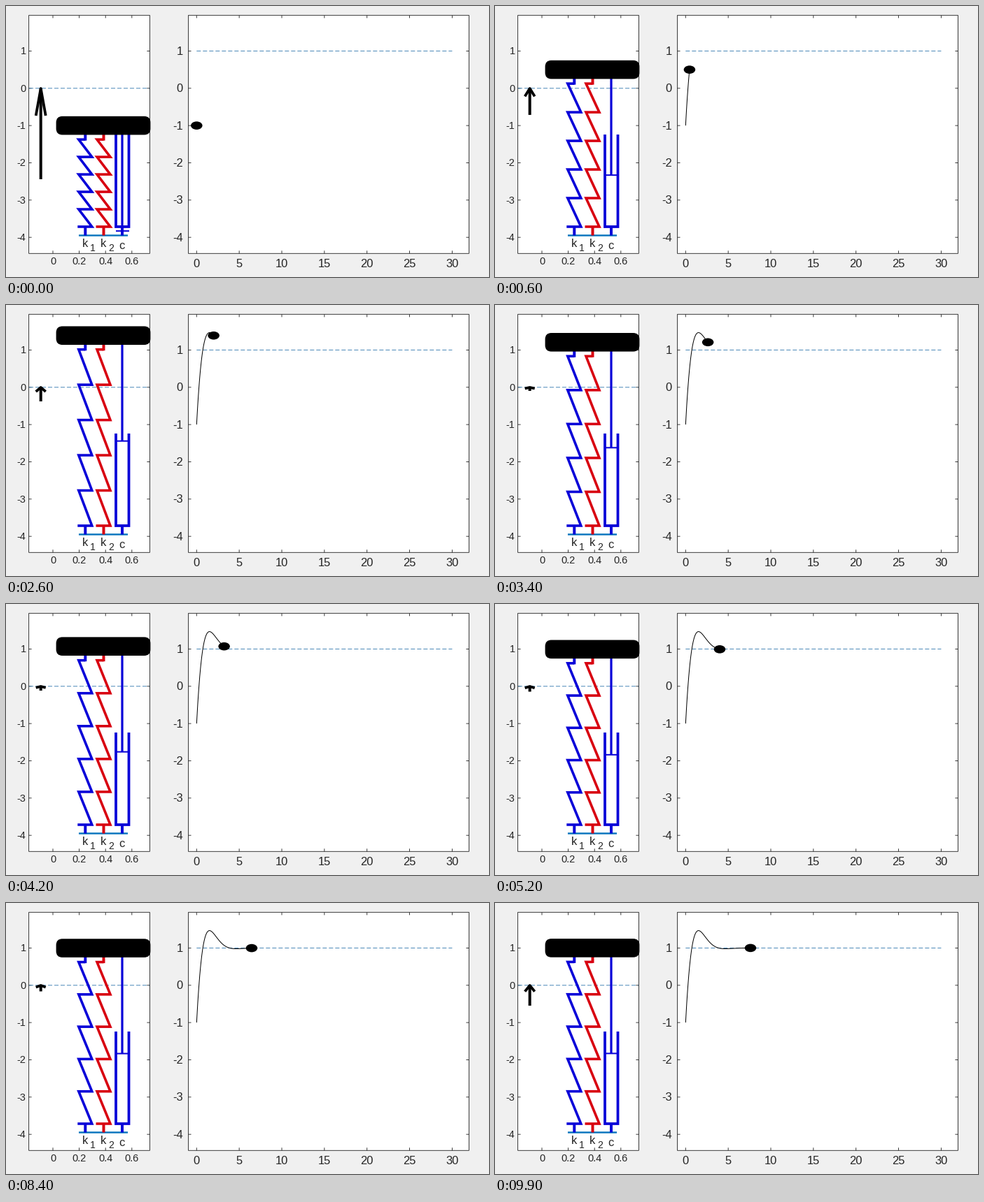
Animation of 690 by 388 pixels, one loop 10000 ms. Source, as a matplotlib script:

```python
import numpy as np
import matplotlib.pyplot as plt
from matplotlib.animation import FuncAnimation
from matplotlib.patches import Ellipse, FancyBboxPatch, Rectangle

W, H, DPI = 690, 388, 100
FRAMES, INTERVAL = 100, 100
DT = 1 / 13
PT = 72 / DPI
BLUE, RED, TEAL, INK = "#0800d8", "#d80010", "#0072bd", "#262626"

plt.rcParams["font.family"] = "Liberation Sans"
fig = plt.figure(figsize=(W / DPI, H / DPI), dpi=DPI, facecolor="#f0f0f0")
ax = fig.add_axes([0, 0, 1, 1])
ax.set_xlim(0, W)
ax.set_ylim(H, 0)
ax.axis("off")


def y_px(v):
    return 117.8 - 53.35 * v


def t_px(t):
    return 272.3 + 12.17 * t


def line(xs, ys, color, width, z=2, **kw):
    kw.setdefault("solid_capstyle", "butt")
    kw.setdefault("solid_joinstyle", "miter")
    return ax.plot(xs, ys, color=color, lw=width * PT, zorder=z,
                   snap=False, **kw)[0]


def label(x, y, s, size, ha="center"):
    ax.text(x, y, s, fontsize=size * PT, color=INK, ha=ha, va="baseline")


def panel(x0, x1, xticks, size, gap, base):
    """White plot box with inward ticks on all four sides."""
    top, bottom, tick = 13.3, 354.3, 4
    ax.add_patch(Rectangle((x0, top), x1 - x0, bottom - top, fc="white",
                           ec=INK, lw=0.9 * PT, zorder=1, snap=False))
    for x, s in xticks:
        line([x, x], [bottom, bottom - tick], INK, 0.9)
        line([x, x], [top, top + tick], INK, 0.9)
        label(x, base, s, size)
    for v in range(-4, 2):
        y = y_px(v)
        line([x0, x0 + tick], [y, y], INK, 0.9)
        line([x1, x1 - tick], [y, y], INK, 0.9)
        label(x0 - gap, y + 0.34 * size, str(v), size, "right")


def dashed(x0, x1, v):
    line([x0, x1], [y_px(v)] * 2, "#4a88b8", 1, dashes=(6, 3))


def response(t):
    """Underdamped step response from -1 to 1."""
    return 1 + np.exp(-t) * (2.24 * np.sin(t) - 2 * np.cos(t))


def force(t):
    """Arrow length in pixels, eased between a few levels."""
    times = np.array([0, 13, 26, 34, 52, 69, 99]) * DT
    levels = [130, 9, 20, 5, 7.5, 2.5, 29]
    return np.exp(np.interp(t, times, np.log(levels)))


panel(32.6, 205.4, [(67 + 37.6 * i, f"{0.2 * i:.1f}" if i else "0")
                    for i in range(4)], 14.5, 4, 370.5)
panel(260.5, 661.4, [(t_px(t), str(t)) for t in range(0, 31, 5)],
      16.5, 7.5, 374.5)
dashed(33, 205, 0)
dashed(t_px(0), t_px(30), 1)

# Fixed parts: ground, stems, damper cylinder, names
FLOOR = 316
line([104, 174], [328.5, 328.5], TEAL, 2.4, 3)
for x, c in ((113.3, BLUE), (139.5, RED), (166, BLUE)):
    line([x, x], [FLOOR, 328.5], c, 4, 4)
line([157, 157, 175.5, 175.5], [184, FLOOR, FLOOR, 184], BLUE, 3.8, 4)
for x, y, s, size in ((109.3, 345, "k", 16.5), (120.3, 351, "1", 14),
                      (135.3, 345, "k", 16.5), (146, 351, "2", 14),
                      (161.6, 347.5, "c", 16.5)):
    label(x, y, s, size, "left")

# Moving parts
springs = [(x, line([], [], c, 3.6, 4), line([], [], c, 4, 4))
           for x, c in ((113.3, BLUE), (139.5, RED))]
rod = line([], [], BLUE, 3.2, 4)
piston = line([], [], BLUE, 2, 4)
mass = FancyBboxPatch((71.6, 0), 134.8, 26.6, fc="black", ec="none",
                      zorder=5, boxstyle="round,pad=0,rounding_size=9")
ax.add_patch(mass)
shaft = line([], [], "black", 4, 5)
head = line([], [], "black", 3.8, 5, solid_joinstyle="round")
trail = line([], [], "black", 1, 3)
dot = Ellipse((0, 0), 16.5, 11.6, fc="black", ec="none", zorder=5)
ax.add_patch(dot)


def draw_spring(x, coil, stem, y):
    top = y + 20
    levels = np.linspace(top, FLOOR, 6)
    xs, ys = [x], [top]
    for a, b in zip(levels, levels[1:]):
        xs += [x - 9.5, x + 9.5]
        ys += [a, b]
    coil.set_data(xs + [x - 11], ys + [FLOOR])
    stem.set_data([x, x], [y + 10, top + 1.5])


def update(i):
    t = i * DT
    y = y_px(response(t))
    mass.set_y(y - 13.3)
    for x, coil, stem in springs:
        draw_spring(x, coil, stem, y)
    rod.set_data([166, 166], [y + 10, y + 151])
    piston.set_data([157, 176], [y + 151, y + 151])

    size, tip = force(t), 118
    shaft.set_data([49.7, 49.7], [tip, tip + size])
    barb = tip + 0.3 * size
    head.set_data([42.7, 49.7, 56.7], [barb, tip, barb])

    ts = np.linspace(0, t, 4 * i + 1)
    trail.set_data(t_px(ts), y_px(response(ts)))
    dot.set_center((t_px(t), y))


anim = FuncAnimation(fig, update, frames=FRAMES, interval=INTERVAL,
                     repeat=True, repeat_delay=0)
plt.show()
```
